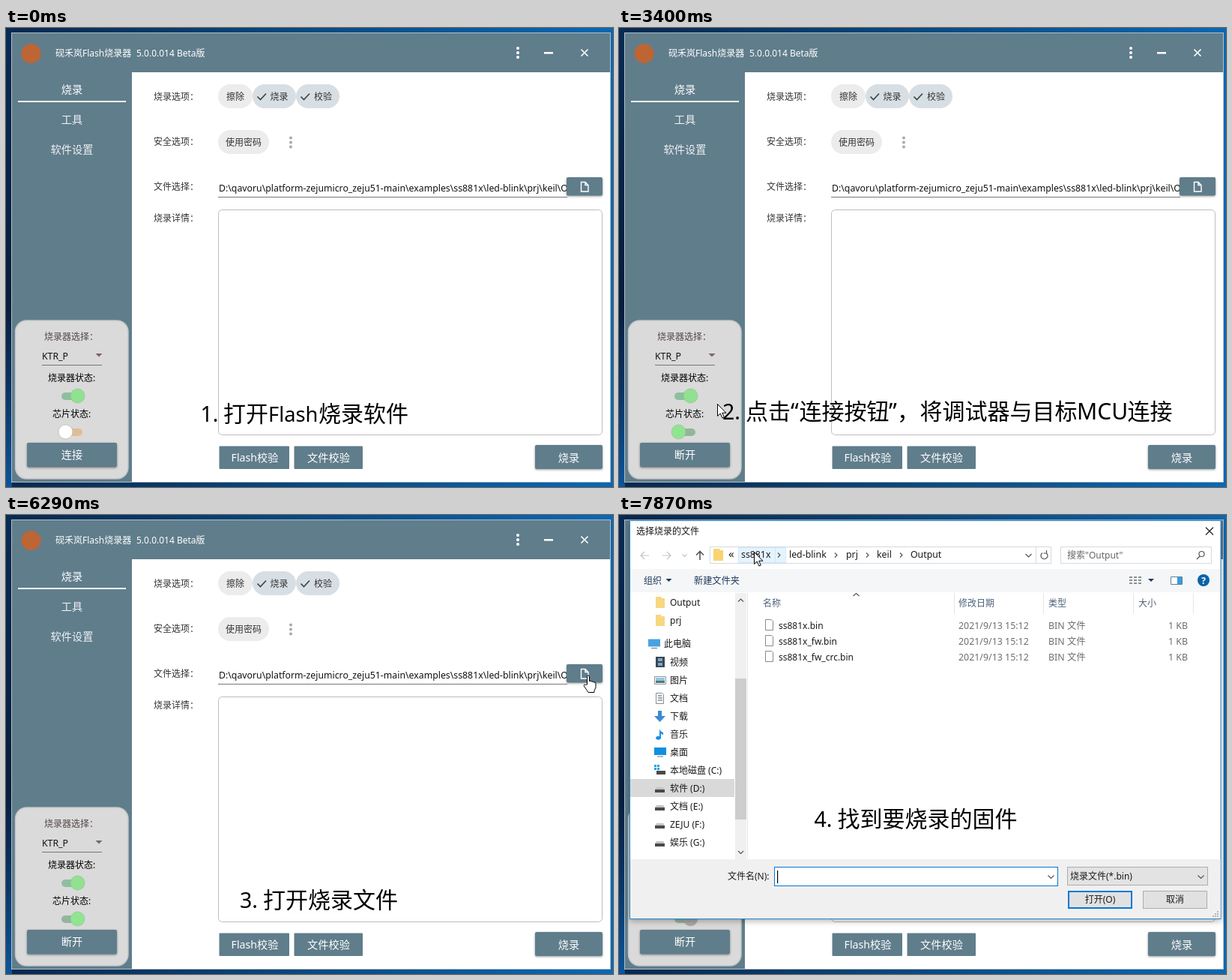
Write an HTML page that moves like this. It is 810x612 px and loops after 8000 ms.

```html
<!DOCTYPE html>
<html lang="zh-CN">
<head>
<meta charset="utf-8">
<title>烧录演示</title>
<style>
html, body { margin: 0; height: 100%; overflow: hidden; }
svg { display: block; width: 100vw; height: 100vh; }
text { font: 12px "Noto Sans", "Noto Sans CJK SC", sans-serif; fill: #333; white-space: pre; }
.colon { font-family: "Noto Sans CJK TC", sans-serif; }
.mid { text-anchor: middle; }
.end { text-anchor: end; }
text.white { fill: #fff; }
.title { font-weight: 500; }
.btn rect { fill: #607d8b; }
.btn .raised { filter: drop-shadow(0 1px 1.5px #0006); }
.btn text, .tabs text { font-size: 14.2px; fill: #fff; text-anchor: middle; }
.path { font-size: 12.3px; fill: #111; }
.line { fill: none; stroke: #555; stroke-width: 1.2; }
.caption text { font-size: 30px; fill: #000; }
.caption .num { font-size: 28.5px; }
.caption .word { font-size: 27.3px; }
.dialog text { fill: #1a1a1a; }
.dialog .blue text { fill: #1e395b; }
.dialog .head text { fill: #4c607a; }
.dialog .grey { fill: #6d6d6d; font-size: 12.4px; }
.frame { filter: drop-shadow(0 2px 4px #0005); }

/* One loop is 8 s, so 1% is 80 ms. */
.a { animation: 8s step-end infinite; }
.caption1 { animation-name: caption1; }
.caption2 { animation-name: caption2; }
.caption3 { animation-name: caption3; }
.caption4 { animation-name: caption4; }
.before { animation-name: before; }
.after { animation-name: after; }
.knob { animation-name: knob, disable; }
.ripple { animation-name: ripple; transform-origin: 73px 564px; }
.flash { animation-name: flash; }
.field { animation-name: field; }
.tip { animation-name: tip; }
.dialog { animation-name: dialog; transform-origin: 408px 273px; }
.listTop { animation-name: listTop; }
.listEnd { animation-name: listEnd; }
.caret { animation-name: caret; }
.crumb { animation-name: crumb; }
.cursor { animation-name: cursor; }
.arrow { animation-name: arrow; }
.hand { animation-name: hand; }
.ibeam { animation-name: ibeam; }

@keyframes caption1 { 0% { opacity: 1 } 14%, 100% { opacity: 0 } }
@keyframes caption2 { 0% { opacity: 0 } 14% { opacity: 1 } 43.25%, 100% { opacity: 0 } }
@keyframes caption3 { 0% { opacity: 0 } 44.1% { opacity: 1 } 79.5%, 100% { opacity: 0 } }
@keyframes caption4 { 0% { opacity: 0 } 82.125%, 100% { opacity: 1 } }
@keyframes before { 0% { opacity: 1 } 42.5%, 100% { opacity: 0 } }
@keyframes after { 0% { opacity: 0 } 42.5%, 100% { opacity: 1 } }
@keyframes knob {
  0% { transform: none }
  43.25% { transform: none; animation-timing-function: steps(3, start) }
  45.6%, 100% { transform: translateX(16px) }
}
@keyframes disable { 0% { fill: #8fe68f } 82.125%, 100% { fill: #aaa } }
@keyframes ripple {
  0% { transform: scale(0); opacity: .25 }
  25.2% { transform: scale(0); opacity: .25; animation-timing-function: steps(5, start) }
  30% { transform: scale(1); opacity: .25 }
  32% { transform: scale(1); opacity: .12 }
  32.875%, 100% { transform: scale(1); opacity: 0 }
}
@keyframes flash { 0% { opacity: 0 } 75.25% { opacity: .12 } 76.1% { opacity: .25 } 78.6%, 100% { opacity: 0 } }
@keyframes field { 0% { opacity: 0 } 56.6% { opacity: 1 } 60.125%, 100% { opacity: 0 } }
@keyframes tip {
  0% { opacity: 0 } 70.125% { opacity: .12 } 71% { opacity: .4 }
  71.875% { opacity: .7 } 72.75% { opacity: .9 } 75.25%, 100% { opacity: 0 }
}
@keyframes dialog {
  0% { opacity: 0; transform: scale(.95) }
  79.5% { opacity: .35; transform: scale(.96) }
  80.375% { opacity: .72; transform: scale(.985) }
  81.25% { opacity: .95; transform: scale(.997) }
  82.125%, 100% { opacity: 1; transform: none }
}
@keyframes listTop { 0% { opacity: 1 } 82.125%, 100% { opacity: 0 } }
@keyframes listEnd { 0% { opacity: 0 } 82.125%, 100% { opacity: 1 } }
@keyframes caret { 0% { opacity: 1 } 88.1% { opacity: 0 } 94.9%, 100% { opacity: 1 } }
@keyframes crumb { 0% { opacity: 0 } 95.75%, 100% { opacity: 1 } }
@keyframes cursor {
  0% { transform: translate(300px, 640px) }
  7.375% { transform: translate(287px, 597px) }
  8.25% { transform: translate(252px, 584px) }
  11.5% { transform: translate(252px, 584px); animation-timing-function: steps(8, start) }
  18.25% { transform: translate(69px, 536px); animation-timing-function: steps(4, start) }
  21.75% { transform: translate(46px, 528px); animation-timing-function: steps(4, start) }
  25.2% { transform: translate(73px, 562px) }
  36.375% { transform: translate(73px, 562px); animation-timing-function: steps(4, start) }
  40.875% { transform: translate(131px, 501px) }
  43.25% { transform: translate(131px, 501px); animation-timing-function: steps(3, start) }
  45.625% { transform: translate(277px, 252px) }
  48.125% { transform: translate(277px, 252px); animation-timing-function: steps(5, start) }
  52.375% { transform: translate(224px, 215px) }
  55.875% { transform: translate(224px, 215px); animation-timing-function: steps(3, start) }
  58.25% { transform: translate(404px, 214px) }
  60.125% { transform: translate(600px, 297px) }
  61% { transform: translate(600px, 297px); animation-timing-function: steps(2, start) }
  62.75% { transform: translate(735px, 281px) }
  64.375% { transform: translate(735px, 281px); animation-timing-function: steps(5, start) }
  68.75% { transform: translate(776px, 212px) }
  83% { transform: translate(776px, 212px); animation-timing-function: steps(2, start) }
  84.75% { transform: translate(750px, 197px) }
  87.25% { transform: translate(750px, 197px); animation-timing-function: steps(5, start) }
  91.5% { transform: translate(87px, 75px) }
  93.125% { transform: translate(87px, 75px); animation-timing-function: steps(5, start) }
  97.5% { transform: translate(180px, 48px) }
  98.375%, 100% { transform: translate(180px, 49px) }
}
@keyframes arrow {
  0% { opacity: 1 } 23.5% { opacity: 0 } 36.375% { opacity: 1 } 56.6% { opacity: 0 }
  60.125% { opacity: 1 } 67.8% { opacity: 0 } 79.5%, 100% { opacity: 1 }
}
@keyframes hand {
  0% { opacity: 0 } 23.5% { opacity: 1 } 36.375% { opacity: 0 }
  67.8% { opacity: 1 } 79.5%, 100% { opacity: 0 }
}
@keyframes ibeam { 0% { opacity: 0 } 56.6% { opacity: 1 } 60.125%, 100% { opacity: 0 } }
</style>
</head>
<body>
<svg viewBox="0 0 810 612">
  <defs>
    <linearGradient id="desk">
      <stop offset="0" stop-color="#06284f"/><stop offset=".5" stop-color="#084a82"/><stop offset="1" stop-color="#0a68b4"/>
    </linearGradient>
    <linearGradient id="deskLeft" x2="0" y2="1">
      <stop offset="0" stop-color="#072c55"/><stop offset=".6" stop-color="#071d3c"/>
      <stop offset=".8" stop-color="#0a3566"/><stop offset="1" stop-color="#0b559a"/>
    </linearGradient>
    <clipPath id="pathClip"><rect x="283" y="200" width="466" height="24"/></clipPath>
    <clipPath id="connectClip"><rect x="28" y="553" width="120" height="33" rx="2"/></clipPath>
  </defs>

  <rect width="810" height="612" fill="url(#desk)"/>
  <rect width="8" height="612" fill="url(#deskLeft)"/>

  <g id="window">
    <rect x="7.5" y="6.5" width="799" height="599" fill="#fff" stroke="#b4c0c6"/>
    <path d="M8 7H806V59H168V605H8z" fill="#607d8b"/>
    <circle cx="33.5" cy="34" r="13" fill="#bd6534"/>
    <text x="66" y="38" class="white title">砚禾岚Flash烧录器</text>
    <text x="174" y="38" class="white title">5.0.0.014 Beta版</text>
    <g fill="#fff"><circle cx="683" cy="27" r="2"/><circle cx="683" cy="33" r="2"/><circle cx="683" cy="39" r="2"/><rect x="718" y="32" width="12" height="2.5"/></g>
    <path d="M767.5 28.5l9 9m0-9l-9 9" stroke="#fff" stroke-width="1.6"/>
    <g class="tabs">
      <text x="88" y="87">烧录</text><text x="88" y="127" opacity=".9">工具</text><text x="88" y="167" opacity=".9">软件设置</text>
    </g>
    <rect x="16" y="97" width="144" height="2" fill="#fff"/>

    <rect x="12.5" y="390" width="150.5" height="211" rx="15" fill="#dadada" stroke="#c2c6c8" stroke-width="1.5"/>
    <text x="51" y="416" style="fill:#544848">烧录器选择<tspan class="colon">：</tspan></text>
    <text x="48" y="442" class="path">KTR_P</text>
    <path d="M48 449.5H128" stroke="#777"/><path d="M119.5 434h9l-4.5 4.5z" fill="#7a6666"/>
    <text x="56" y="471" style="fill:#000">烧录器状态:</text>
    <text x="62" y="519" style="fill:#000">芯片状态:</text>
    <rect x="74" y="486" width="28" height="10" rx="5" fill="#8fbf9f"/>
    <circle cx="95.5" cy="490.5" r="9.5" fill="#90e290" stroke="#9ab59a" stroke-width=".6"/>
    <rect x="74" y="534" width="28" height="10" rx="5" fill="#dfbd95" class="a before"/>
    <rect x="74" y="534" width="28" height="10" rx="5" fill="#94b59c" class="a after"/>
    <g class="a knob" stroke="#a5b0a5" stroke-width=".6">
      <circle cx="79.5" cy="538.5" r="9.5" fill="#fff" class="a before"/>
      <circle cx="79.5" cy="538.5" r="9.5" class="a after"/>
    </g>
    <g class="btn">
      <rect x="28" y="553" width="120" height="32.5" rx="2" class="raised"/>
      <text x="88" y="574" class="a before">连接</text><text x="88" y="574" class="a after">断开</text>
      <g clip-path="url(#connectClip)"><circle cx="73" cy="564" r="80" fill="#fff" class="a ripple"/></g>
    </g>

    <text x="197" y="96">烧录选项<tspan class="colon">：</tspan></text>
    <text x="197" y="156">安全选项<tspan class="colon">：</tspan></text>
    <text x="197" y="216">文件选择<tspan class="colon">：</tspan></text>
    <text x="197" y="258">烧录详情<tspan class="colon">：</tspan></text>
    <rect x="283" y="75" width="46" height="32" rx="16" fill="#ececec"/>
    <rect x="329" y="75" width="58" height="32" rx="16" fill="#d8dfe4"/>
    <rect x="387" y="75" width="58" height="32" rx="16" fill="#d8dfe4"/>
    <rect x="283" y="136" width="68" height="32" rx="16" fill="#ececec"/>
    <path d="M335.5 91.5l4 4 7.5-8M393.5 91.5l4 4 7.5-8" class="line" style="stroke:#37474f;stroke-width:1.7"/>
    <text x="306" y="96" class="mid">擦除</text><text x="352.5" y="96">烧录</text><text x="411" y="96">校验</text>
    <text x="317" y="157" class="mid">使用密码</text>
    <g fill="#a9a9a9"><circle cx="380" cy="146.5" r="2"/><circle cx="380" cy="152.5" r="2"/><circle cx="380" cy="158.5" r="2"/></g>
    <g clip-path="url(#pathClip)"><text x="284" y="218" class="path">D:\qavoru\platform-zejumicro_zeju51-main\examples\ss881x\led-blink\prj\keil\Output</text></g>
    <path d="M283 225.5H749" stroke="#777"/>
    <path d="M283 225.5H749" stroke="#607d8b" stroke-width="2" class="a field"/>
    <rect x="283.5" y="242.5" width="512" height="300" rx="5" fill="#fff" stroke="#bdbdbd"/>
    <g class="btn">
      <rect x="748" y="199" width="48" height="24.5" rx="2" class="raised"/>
      <path d="M767.5 205.5h5.5l4 4v8.5h-9.5zM773 205.5v4h4" fill="none" stroke="#fff" stroke-width="1.4"/>
      <path d="M748 199h48v25h-48z" fill="#fff" class="a flash"/>
      <rect x="284.5" y="557.5" width="93.5" height="30.5" rx="1"/><text x="332" y="578">Flash校验</text>
      <rect x="384.5" y="557.5" width="91.5" height="30.5" rx="1"/><text x="430.5" y="578">文件校验</text>
      <rect x="706" y="556" width="90" height="32" rx="2" class="raised"/><text x="751" y="578">烧录</text>
    </g>
    <g class="a tip">
      <rect x="725" y="238" width="92" height="31" rx="2" fill="#616161"/><text x="733" y="258" class="white">打开Flash文件</text>
    </g>
  </g>

  <g class="a dialog">
    <rect x="14.5" y="7.5" width="788.5" height="531" fill="#fff" stroke="#2a84cc" class="frame"/>
    <text x="23" y="26">选择烧录的文件</text>
    <path d="M783 16.5l10 10m0-10l-10 10" class="line" style="stroke:#222"/>
    <path d="M40 54H29m5-5l-5 5 5 5M58 54h11m-5-5l5 5-5 5M84.5 52.5l3 3 3-3" class="line" style="stroke:#c4c4c4"/>
    <path d="M108 60V48.5m-5 5l5-5 5 5" class="line" style="stroke-width:1.6"/>
    <path d="M121.5 42.5h455v22h-455zM556.5 42.5v22M589.5 42.5h201v22h-201z" fill="none" stroke="#d9d9d9"/>
    <g class="a crumb"><path d="M159.5 43.5h63v20h-63zM208.5 43.5v20" fill="#e5f3ff" stroke="#cce8ff"/></g>
    <path d="M126 45h8l1 2h4v14h-13z" fill="#f7d572"/>
    <g id="crumbs"></g>
    <path d="M542.5 52l4 4 4-4" class="line"/>
    <path d="M570 50.5a4.5 4.5 0 1 1-5 0M570.5 47v4h-4" class="line"/>
    <text x="598" y="58" style="fill:#666">搜索"Output"</text>
    <g class="line"><circle cx="777.5" cy="52" r="3.5"/><path d="M775 55l-4 4"/></g>

    <rect x="15" y="72" width="787" height="31" fill="#f5f6f7"/>
    <g class="blue"><text x="33" y="92">组织</text><text x="100" y="92" style="font-size:12.2px">新建文件夹</text></g>
    <path d="M62.5 85h8l-4 4zM706 85h8l-4 4z" fill="#1e395b"/>
    <path d="M681 83h4m-4 4h4m-4 4h4m2-8h4m-4 4h4m-4 4h4m2-8h4m-4 4h4m-4 4h4" stroke="#8a8f96" stroke-width="2"/>
    <path d="M736.5 82.5h15v10h-15z" fill="#fff" stroke="#5b7f9e"/><rect x="745" y="83" width="6" height="9" fill="#3a9bdc"/>
    <circle cx="780" cy="87" r="8" fill="#0a64a8"/><text x="780" y="91.5" class="mid" style="fill:#fff;font-weight:700">?</text>

    <path d="M447.5 104v28m119-28v28m120-28v28m80-28v28M171.5 104v355" stroke="#e6e6e6"/>
    <path d="M312.5 108l4-3.5 4 3.5" class="line"/>
    <g class="head"><text x="192" y="122">名称</text><text x="453" y="122">修改日期</text><text x="573" y="122">类型</text><text x="693" y="122">大小</text></g>
    <g id="files"></g>
    <g id="listTop" class="a listTop"></g>
    <g class="a listEnd">
      <rect x="155" y="104" width="15" height="355" fill="#f0f0f0"/><rect x="155" y="218" width="15" height="188" fill="#cdcdcd"/>
      <path d="M159 115.5l3.5-3.5 3.5 3.5M159 448l3.5 3.5 3.5-3.5" class="line"/>
      <g id="listEnd"></g>
    </g>

    <rect x="15" y="459" width="787.5" height="79" fill="#f0f0f0"/>
    <text x="145" y="486">文件名(N):</text>
    <rect x="207.5" y="469.5" width="378" height="25" fill="#fff" stroke="#0078d7"/>
    <rect x="211" y="474" width="1.2" height="17" class="a caret"/>
    <rect x="598.5" y="469.5" width="187" height="24" fill="#e3e3e3" stroke="#adadad"/>
    <path d="M572.5 480.5l4 4 4-4M772.5 480.5l4 4 4-4" class="line"/>
    <text x="602" y="486">烧录文件(*.bin)</text>
    <rect x="600" y="502" width="84" height="22" fill="#e1e1e1" stroke="#0078d7" stroke-width="2"/>
    <rect x="699.5" y="501.5" width="85" height="23" fill="#e1e1e1" stroke="#adadad"/>
    <text x="642" y="517" class="mid">打开(O)</text><text x="742" y="517" class="mid">取消</text>
    <path d="M798 529h2m-5 3h2m1 0h2m-8 3h2m1 0h2m1 0h2" stroke="#b5b5b5" stroke-width="2"/>
  </g>

  <g class="caption">
    <text class="a caption1" y="525"><tspan x="259.5" class="num">1.</tspan><tspan x="290">打开</tspan><tspan x="350" class="word">Flash</tspan><tspan x="417">烧录软件</tspan></text>
    <text class="a caption2" y="522"><tspan x="138" class="num">2.</tspan><tspan x="169">点击</tspan><tspan x="229">“</tspan><tspan x="240.5">连接按钮</tspan><tspan x="360">”</tspan><tspan x="371">，</tspan><tspan x="401.5">将调试器与目标</tspan><tspan x="611">MCU</tspan><tspan x="678.5">连接</tspan></text>
    <text class="a caption3" y="524"><tspan x="312" class="num">3.</tspan><tspan x="343">打开烧录文件</tspan></text>
    <text class="a caption4" y="416"><tspan x="260.5" class="num">4.</tspan><tspan x="291.5">找到要烧录的固件</tspan></text>
  </g>

  <g class="a cursor" fill="#fff" stroke="#000">
    <path class="a arrow" d="M.5.5v16l3.7-3.5 2.7 6 2.4-1-2.6-5.8h5.2z"/>
    <path class="a hand" d="M-.5 14V3.5q0-1.5 1.5-1.5t1.5 1.5v6q2-1 3 .7 2-.7 2.8.8 2.7-.5 2.7 2v5l-2 4.5v2H1l-2-3-4-6q.5-2 2.5-1z"/>
    <path class="a ibeam" fill="none" d="M-3-8.500h2.500l.5.500.5-.5H3M0-8V8M-3 8.500h2.500L0 8l.5.500H3"/>
  </g>
</svg>

<script>
const fill = (id, parts) => document.getElementById(id).innerHTML = parts.join('');

// Small icons, each drawn in a box of about 16 by 14
const screen = color => `<path d="M0 1h16v10H0z" fill="${color}"/><path d="M4 13h8" stroke="#678"/>`;
const sheet = '<path d="M2.5.5h8l2 2v12h-10z" fill="#fff" stroke="#8a8a8a"/>';
const icons = {
  folder: '<path d="M2 0h7l1 2h4v13H2z" fill="#f7d780"/>',
  pc: screen('#4aa3df'),
  desktop: screen('#0f8fe0'),
  network: screen('#4a9bd6'),
  video: '<path d="M2 0h12v14H2z" fill="#3c4650"/><path d="M5 2h6v4H5zM5 8h6v4H5z" fill="#7aa7c7"/>',
  picture: '<path d="M.5 2.5h15v10H.5z" fill="#fff" stroke="#8a949c"/><path d="M2 4h12v4H2z" fill="#8cc5ea"/><path d="M2 8h12v3H2z" fill="#55796b"/>',
  document: sheet + '<path d="M5 4h5M5 7h6M5 10h6" stroke="#7891a5" stroke-width="1.5"/>',
  download: '<path d="M5 0h5v7h5l-7.5 8L0 7h5z" fill="#3a8ad6"/>',
  music: '<path d="M7 0q1 4 5 5v3q-3-.5-3-2v6a3.5 2.5 0 1 1-2-2z" fill="#1e8fe0"/>',
  drive: '<path d="M3 6h9l2 3H1z" fill="#c4c4c4"/><path d="M1 9h13v4H1z" fill="#4a4a4a"/>',
  system: '<path d="M0 0h3v3H0zM4 0h3v3H4zM0 4h3v3H0zM4 4h3v3H4z" fill="#18a0e8"/><path d="M3 8h12v5H3z" fill="#4a4a4a"/>',
  star: '<path d="M8 0l2 5h6l-5 3.5 2 6-5-3.5-5 3.5 2-6L0 5h6z" fill="#3f9be0"/>'
};

const item = ([y, icon, label, root]) =>
  `<g transform="translate(${root ? 39 : 47} ${y - 7})">${icons[icon]}</g>
   <text x="${root ? 60 : 68}" y="${y + 4.5}">${label}</text>`;
const selected = (y, width) => `<rect x="15" y="${y - 12}" width="${width}" height="24" fill="#d9d9d9"/>`;
const column = (top, rows) => rows.map(([icon, label], i) => item([top + 24 * i, icon, label]));
const pin = y => `<path d="M158 ${y + 4}l3-3m-1-3l5 5m-3-6l4 4" stroke="#8b9199" stroke-width="1.5"/>`;

fill('listTop', [
  selected(355, 155),
  item([131, 'star', '快速访问', true]),
  ...column(155, [['desktop', '桌面'], ['download', '下载'], ['document', '文档'], ['picture', '图片'],
    ['folder', 'doc'], ['folder', 'keil'], ['folder', 'Output'], ['folder', 'prj']]),
  ...[155, 179, 203, 227].map(pin),
  item([355, 'pc', '此电脑', true]),
  item([387, 'drive', 'ZEJU (F:)', true]),
  item([419, 'network', '网络', true])
]);

fill('listEnd', [
  selected(364, 139),
  ...column(116, [['folder', 'Output'], ['folder', 'prj']]),
  item([171.5, 'pc', '此电脑', true]),
  ...column(196, [['video', '视频'], ['picture', '图片'], ['document', '文档'], ['download', '下载'],
    ['music', '音乐'], ['desktop', '桌面'], ['system', '本地磁盘 (C:)'], ['drive', '软件 (D:)'],
    ['drive', '文档 (E:)'], ['drive', 'ZEJU (F:)'], ['drive', '娱乐 (G:)']])
]);

fill('files', ['ss881x.bin', 'ss881x_fw.bin', 'ss881x_fw_crc.bin'].map((name, i) => {
  const y = 152 + 21 * i;
  return `<g transform="translate(193 ${y - 13})">${sheet}</g>
    <text x="213" y="${y}">${name}</text>
    <text x="453" y="${y}" class="grey">2021/9/13 15:12</text>
    <text x="573" y="${y}" class="grey">BIN 文件</text>
    <text x="759" y="${y}" class="grey end">1 KB</text>`;
}));

fill('crumbs', [
  '<text x="146" y="57" style="font-size:15px">«</text>',
  ...[[163, 'ss881x'], [227, 'led-blink'], [303, 'prj'], [344, 'keil'], [389, 'Output']]
    .map(([x, label]) => `<text x="${x}" y="57" style="font-size:12.3px">${label}</text>`),
  ...[212, 288, 330, 375].map(x => `<path d="M${x} 50.5l3 3-3 3" class="line"/>`)
]);
</script>
</body>
</html>
```
